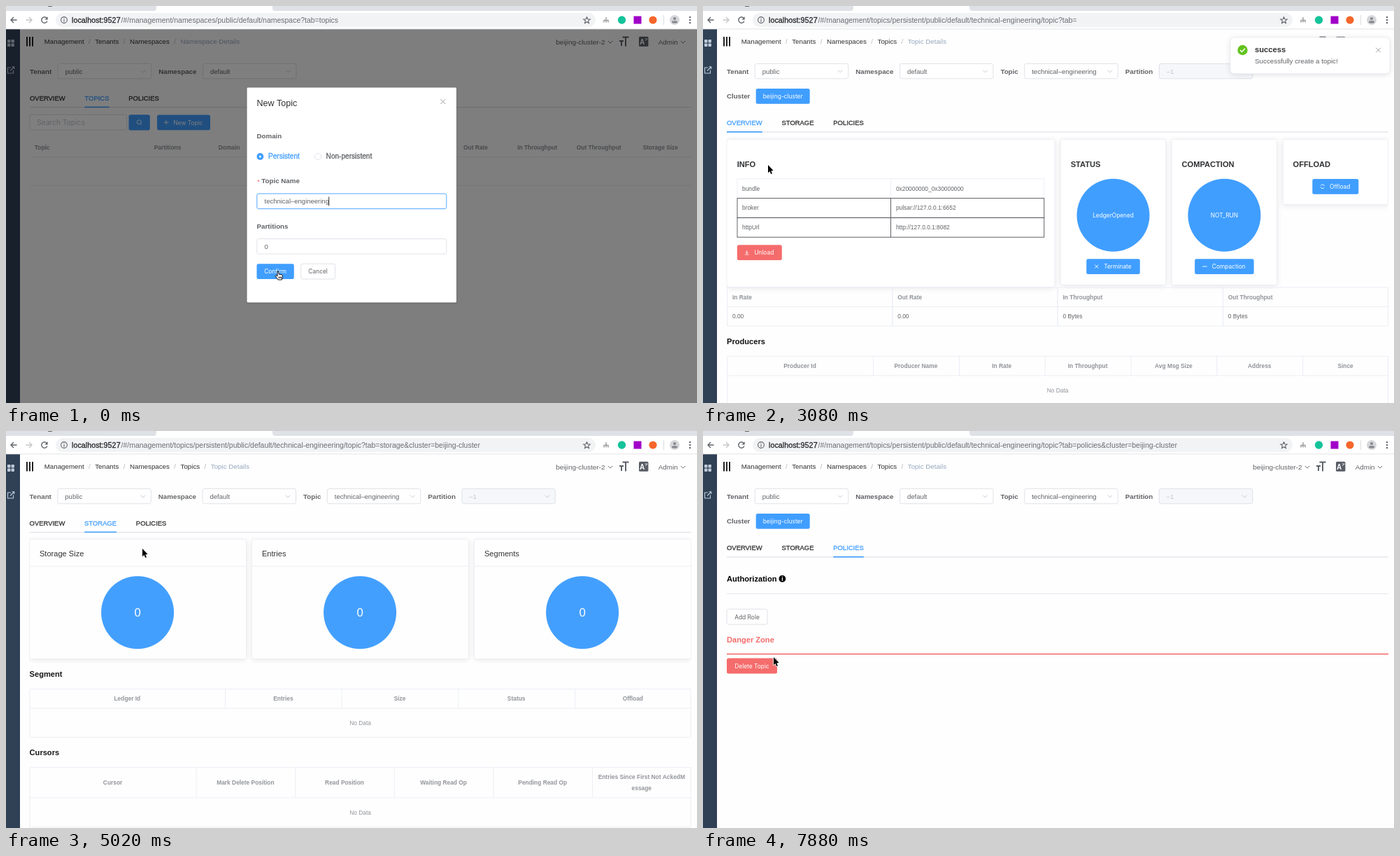
Recreate the animation shown at these times as an HTML page with a canvas. Size 988 by 567 pixels, loop 8000 ms.

```html
<!DOCTYPE html>
<html lang="en">
<head>
<meta charset="utf-8">
<title>Topic management</title>
<style>
html, body { margin: 0; width: 100%; height: 100%; overflow: hidden; background: #fefefe; }
canvas { display: block; width: 988px; height: 567px; }
</style>
</head>
<body>
<canvas id="stage"></canvas>
<script>
const W = 988, H = 567, LOOP = 8000;
const STEP = 78.9; // refresh interval of the screen
const LEFT = 34, WIDE = 946;
const dpr = window.devicePixelRatio || 1;

function context(canvas) {
  canvas.width = W * dpr;
  canvas.height = H * dpr;
  return canvas.getContext('2d');
}
let c = context(document.getElementById('stage'));
const buffer = context(document.createElement('canvas'));

const BLUE = '#409eff', RED = '#f56c6c', DARK = '#303133', TEXT = '#606266', MUTE = '#909399',
  PALE = '#c0c4cc', EDGE = '#dcdfe6', LINE = '#ebeef5', PAGE = '#fefefe', CHROME = '#5f6368';
const SANS = '"Liberation Sans", Arial, sans-serif', ROUND = 'Inter, sans-serif';

const clamp = v => Math.max(0, Math.min(1, v));

// cubic-bezier(.25, .1, .25, 1)
function ease(x) {
  let lo = 0, hi = 1, u = x;
  for (let i = 0; i < 20; i++) {
    u = (lo + hi) / 2;
    const v = .75 * u * (1 - u) + u ** 3;
    if (v < x) lo = u; else hi = u;
  }
  return .3 * u * (1 - u) ** 2 + 3 * u * u * (1 - u) + u ** 3;
}
const tween = (t, start, dur) => {
  const k = clamp((t - start) / dur);
  return k === 0 || k === 1 ? k : ease(k);
};

// opt: b = bold, m = medium, c = centred, i = Inter; returns the width
function txt(s, x, y, size, color, opt = '') {
  c.font = (opt.includes('b') ? 'bold ' : '') + size + 'px ' + (opt.includes('i') ? ROUND : SANS);
  c.textAlign = opt.includes('c') ? 'center' : 'left';
  c.fillStyle = c.strokeStyle = color;
  c.fillText(s, x, y);
  if (opt.includes('m')) {
    c.lineWidth = .3;
    c.strokeText(s, x, y);
  }
  return c.measureText(s).width;
}
function rect(x, y, w, h, color) {
  c.fillStyle = color;
  c.fillRect(x, y, w, h);
}
function box(x, y, w, h, fill, edge, r = 2.5) {
  c.beginPath();
  c.roundRect(x, y, w, h, r);
  if (fill) { c.fillStyle = fill; c.fill(); }
  if (edge) { c.strokeStyle = edge; c.lineWidth = .9; c.stroke(); }
}
function arc(x, y, r, from, to, color, lw) {
  c.beginPath();
  c.arc(x, y, r, from, to);
  c.strokeStyle = color;
  c.lineWidth = lw;
  c.stroke();
}
function disc(x, y, r, fill) {
  c.beginPath();
  c.arc(x, y, r, 0, 7);
  c.fillStyle = fill;
  c.fill();
}
// Each item after the width is one polyline around (x, y)
function strokes(x, y, color, lw, ...lines) {
  c.beginPath();
  for (const p of lines)
    for (let i = 0; i < p.length; i += 2) c[i ? 'lineTo' : 'moveTo'](x + p[i], y + p[i + 1]);
  c.strokeStyle = color;
  c.lineWidth = lw;
  c.stroke();
}
function shape(x, y, p, fill) {
  c.beginPath();
  for (let i = 0; i < p.length; i += 2) c.lineTo(x + p[i], y + p[i + 1]);
  c.closePath();
  c.fillStyle = fill;
  c.fill();
}
function raised(x, y, w, h, r, color, blur, dy, edge) {
  c.shadowColor = color;
  c.shadowBlur = blur * dpr;
  c.shadowOffsetY = dy * dpr;
  box(x, y, w, h, '#fff', null, r);
  c.shadowColor = 'transparent';
  if (edge) box(x, y, w, h, null, edge, r);
}
// Draws a group and lays it down with one common opacity
function layer(alpha, dx, dy, draw) {
  const main = c;
  c = buffer;
  c.setTransform(dpr, 0, 0, dpr, 0, 0);
  c.clearRect(0, 0, W, H);
  c.translate(dx, dy);
  draw();
  c = main;
  c.globalAlpha = alpha;
  c.drawImage(buffer.canvas, 0, 0, W, H);
  c.globalAlpha = 1;
}

const chevron = (x, y, color) => strokes(x, y, color, .9, [-3.2, -1.6, 0, 1.6, 3.2, -1.6]);
const cross = (x, y, r, color) => strokes(x, y, color, .9, [-r, -r, r, r], [r, -r, -r, r]);
const minus = (x, y) => strokes(x, y, '#fff', .9, [-3.3, 0, 3.3, 0]);
const tray = (x, y, down, color) => strokes(x, y, color, .8, [-3, 3, 3, 3], [0, -3, 0, 1.6],
  down ? [-2, -.5, 0, 1.5, 2, -.5] : [-2, -1, 0, -3, 2, -1]);
const refresh = (x, y) => [.5, 3.6].forEach(a => arc(x, y, 2.8, a, a + 2.4, '#fff', .9));
const backArrow = (x, dir, color) =>
  strokes(x, 20, color, 1.4, [4.5 * dir, 0, -4 * dir, 0], [0, -4, -4 * dir, 0, 0, 4]);

function browser(t) {
  rect(0, 0, W, 33, '#fff');
  box(-8, -10, 223, 17, '#dee1e6', null, 4);
  box(381, -10, 620, 17, '#dee1e6', null, 4);
  rect(60, 0, 6, 1, '#666');
  backArrow(11, 1, CHROME);
  backArrow(33, -1, '#c4c6c9');
  arc(55, 20, 4.2, .4, 5.5, CHROME, 1.4);
  shape(55, 20, [4.6, -5, 4.6, -.6, .4, -.6], CHROME);
  box(71, 10, 772, 20, '#f1f3f4', null, 10);
  arc(83, 20, 4.4, 0, 7, CHROME, 1.1);
  strokes(83, 20, CHROME, 1.2, [0, -2.6, 0, -1.4], [0, -.6, 0, 2.4]);
  txt('localhost:9527', 94, 23.7, 10.8, '#27292c', 'm');
  const topic = '/#/management/topics/persistent/public/default/technical-engineering/topic?tab=';
  const path = t < 2200 ? '/#/management/namespaces/public/default/namespace?tab=topics'
    : t < 3940 ? topic
    : topic + (t < 5990 ? 'storage' : 'policies') + '&cluster=beijing-cluster';
  txt(path, 164.6, 23.7, 10.48, '#6b6f74');
  const star = [];
  for (let i = 0; i <= 10; i++) {
    const r = i % 2 ? 2.2 : 5, a = i * Math.PI / 5 - Math.PI / 2;
    star.push(r * Math.cos(a), r * Math.sin(a));
  }
  strokes(830.5, 20.5, CHROME, 1.1, star);
  strokes(858, 20, '#9a9a9a', 1.4, [0, -4, 0, 3.5], [-3, 3.5, -3, .5, 3, .5, 3, 3.5]);
  disc(880.5, 20, 5.7, '#15c39a');
  rect(897.5, 14.5, 11, 11, '#a100c8');
  disc(925, 20, 5.6, '#f4662a');
  rect(940, 13, 1, 14, '#dadce0');
  disc(956, 20, 7, '#d5d7da');
  disc(956, 18, 2.1, '#85898e');
  box(952, 21.2, 8, 3.2, '#85898e', null, 1.6);
  for (const y of [16, 20, 24]) disc(978, y, 1.2, CHROME);
  rect(0, 32.5, W, .8, '#dcdcdc');
}

function breadcrumb(t) {
  const items = ['Management', 'Tenants', 'Namespaces'];
  if (t < 2300) items.push('Namespace Details');
  else items.push('Topics', 'Topic Details');
  let x = 54.7;
  items.forEach((s, i) => {
    const last = i === items.length - 1;
    x += txt(s, x, 54.3, 9.75, last ? '#97a8be' : DARK) + 6.3;
    if (!last || (t >= 2200 && t < 2300)) x += txt('/', x, 54.3, 9.8, '#b4b8c0') + 6.6;
  });
}

function shell(t) {
  rect(0, 33, 20, H - 33, '#304156');
  for (const x of [2, 7.5]) for (const y of [48, 53.5]) box(x, y, 4.4, 4.4, '#bfcbd9', null, .8);
  strokes(7, 91.5, '#bfcbd9', 1.1, [0, -3.5, -4.5, -3.5, -4.5, 4.5, 3.5, 4.5, 3.5, 0],
    [-1, 1, 4.5, -4.5], [1.5, -4.7, 4.7, -4.7, 4.7, -1.5]);
  for (const x of [29, 33, 37]) rect(x, 44, 2, 13.5, '#222');
  breadcrumb(t);
  txt('beijing-cluster-2', 786.3, 55, 9.95, TEXT);
  chevron(864, 51.5, TEXT);
  strokes(883, 51, '#5a5e66', 1.9, [-1.5, -6.5, 7.5, -6.5], [3, -6.5, 3, 6.5], [-6, -1, 0, -1], [-3, -1, -3, 6]);
  box(905, 43.7, 13.4, 14, '#5a5e66', null, 1.5);
  txt('A', 906, 55, 10, '#fff', 'b');
  strokes(915.5, 48, '#fff', .8, [-1.8, -1, 1.8, -1], [-1.5, 2, 1.5, -1]);
  txt('Admin', 932.8, 55, 9.8, TEXT);
  chevron(968, 51.5, TEXT);
}

// With an icon, the label moves right to make room for it
function button(x, y, w, fill, label, icon) {
  const plain = fill === '#fff', mid = x + w / 2;
  box(x, y, w, 21.8, fill, plain ? EDGE : null);
  const size = txt(label, mid + (icon ? 6.4 : 0), y + 14.1, 8.4, plain ? TEXT : '#fff', 'ci');
  if (icon) icon(mid - size / 2 - 4, y + 10.8);
}

function filters(topic, cluster) {
  const items = [['Tenant', 'public'], ['Namespace', 'default']];
  if (topic) items.push(['Topic', 'technical–engineering'], ['Partition', '–1']);
  let x = LEFT;
  for (const [label, value] of items) {
    const off = value === '–1';
    x += txt(label, x, 96.6, 9.75, TEXT, 'b') + 9;
    box(x, 82.4, 133.5, 21.4, off ? '#f5f7fa' : '#fff', EDGE);
    txt(value, x + 10.5, 96.7, 9.5, off ? PALE : TEXT);
    chevron(x + 122, 93.3, PALE);
    x += 144;
  }
  if (!cluster) return;
  txt('Cluster', LEFT, 132, 9.7, TEXT, 'b');
  button(75.7, 118, 77, BLUE, 'beijing-cluster');
}

function tabs(second, active, y, hover) {
  rect(LEFT, y + 13, WIDE, 1.2, '#dfe2e8');
  let x = LEFT;
  for (const s of ['OVERVIEW', second, 'POLICIES']) {
    const w = txt(s, x, y + 3.7, 9.45, s === active || s === hover ? BLUE : DARK, 'm');
    if (s === active) rect(x, y + 12.6, w, 1.6, BLUE);
    x += w + 27.8;
  }
}

// A first column of its own width, the others equal; one header row
function table(y, first, heads, headH, bodyH) {
  const rest = (WIDE - first) / (heads.length - 1);
  c.strokeStyle = LINE;
  c.lineWidth = 1;
  c.strokeRect(LEFT + .5, y, WIDE - 1, headH + bodyH);
  rect(LEFT, y + headH - .5, WIDE, 1, LINE);
  heads.forEach((s, i) => {
    const x = LEFT + (i ? first + rest * (i - .5) : first / 2);
    if (i) rect(x - rest / 2, y, 1, headH, LINE);
    s.split('\n').forEach((line, k, all) =>
      txt(line, x, y + headH / 2 + 3.1 + (k - (all.length - 1) / 2) * 16, 8.4, MUTE, 'bc'));
  });
  txt('No Data', 507, y + headH + 24, 8.4, MUTE, 'c');
}
const heading = (s, x, y, color = '#111') => txt(s, x, y, 11.1, color, 'b');

function card(x, y, w, h) {
  c.save();
  c.beginPath();
  c.rect(LEFT - .5, y - 10, WIDE + .5, h + 40);
  c.clip();
  raised(x, y, w, h, 2.8, 'rgba(0,0,0,.1)', 8.4, 1.4, LINE);
  c.restore();
}

function topicsPage(t) {
  filters();
  tabs('TOPICS', 'TOPICS', 131);
  box(LEFT, 155.3, 138.5, 21.6, '#fff', EDGE);
  txt('Search Topics', 44.3, 169.7, 10.2, PALE, 'i');
  box(175.5, 155.2, 30.3, 22.2, BLUE);
  arc(190.3, 165.8, 3, 0, 7, '#fff', .9);
  strokes(190.3, 165.8, '#fff', .9, [2.1, 2.1, 3.8, 3.8]);
  button(216, 155.4, 76, BLUE, 'New Topic', (x, y) => {
    minus(x, y);
    strokes(x, y, '#fff', .9, [0, -3.3, 0, 3.3]);
  });

  const colX = i => 231 + i * 88.1;
  txt('Topic', 40.8, 204.7, 8.4, MUTE, 'b');
  ['Partitions', 'Domain', 'Producers', 'Subscriptions', 'In Rate', 'Out Rate', 'In Throughput',
    'Out Throughput', 'Storage Size'].forEach((s, i) => txt(s, colX(i), 204.7, 8.4, MUTE, 'bc'));
  rect(LEFT, 215, WIDE, 1, LINE);
  if (t < 940) {
    txt('No Data', 506.7, 239.6, 8.4, TEXT, 'c');
    rect(LEFT, 256, WIDE, 1, LINE);
    return;
  }
  if (t >= 1570) rect(LEFT, 216, WIDE, 26.5, '#f5f7fa');
  rect(LEFT, 242.3, WIDE, 1, LINE);
  strokes(47.5, 228.5, TEXT, .9, [-1.6, -3.4, 1.8, 0, -1.6, 3.4]);
  txt('technical-engineering', 56.8, 231.8, 8.4, BLUE);
  ['0', 'persistent', '0', '0', '0.00', '0.00', '0 Bytes', '0 Bytes', '0 Bytes'].forEach((s, i) => {
    const icon = i > 3 && i < 8;
    const w = txt(s, colX(i) + (icon ? 4.6 : 0), 231.8, 8.4, TEXT, 'c');
    if (icon) tray(colX(i) - w / 2, 228.5, i % 2 === 0, TEXT);
  });
}

function overviewPage(t) {
  filters(true, true);
  tabs('STORAGE', 'OVERVIEW', 166.4, t >= 3700 ? 'STORAGE' : '');
  card(LEFT, 190.5, 469, 211);
  heading('INFO', 48.7, 229.6, DARK);
  c.strokeStyle = LINE;
  c.lineWidth = 1;
  [['bundle', '0x20000000_0x30000000'], ['broker', 'pulsar://127.0.0.1:6652'], ['httpUrl', 'http://127.0.0.1:8082']]
    .forEach(([key, value], i) => {
      const y = 246.8 + i * 27.8;
      c.strokeRect(49, y, 219.5, 27.8);
      c.strokeRect(268.5, y, 219.2, 27.8);
      txt(key, 56, y + 16.8, 8.4, TEXT);
      txt(value, 275.9, y + 16.8, 8.4, TEXT);
    });
  button(48.8, 341.2, 64, RED, 'Unload', (x, y) => tray(x, y, true, '#fff'));

  [['STATUS', 'LedgerOpened', 'Terminate', 76.5, (x, y) => cross(x, y, 2.5, '#fff')],
    ['COMPACTION', 'NOT_RUN', 'Compaction', 84.5, minus],
    ['OFFLOAD', '', 'Offload', 66, refresh]].forEach(([title, state, action, w, icon], i) => {
    const x = 511.3 + i * 158.9, mid = x + 75.2;
    card(x, 190.5, 150.4, state ? 208 : 93);
    heading(title, x + 14.4, 229.6, DARK);
    if (state) {
      disc(mid, 298.8, 52, BLUE);
      txt(state, mid, 301.6, 8.3, '#fff', 'ci');
    }
    button(mid - w / 2, state ? 361.2 : 247, w, BLUE, action, icon);
  });

  ['In Rate', 'Out Rate', 'In Throughput', 'Out Throughput'].forEach((s, i) => {
    const x = LEFT + .5 + i * 236.3;
    c.strokeStyle = LINE;
    c.lineWidth = 1;
    for (const y of [402, 429.5]) c.strokeRect(x, y, 236.3, 27.5);
    txt(s, x + 7.4, 418.8, 8.4, MUTE, 'b');
    txt(i < 2 ? '0.00' : '0 Bytes', x + 7.4, 445.9, 8.4, TEXT);
  });
  heading('Producers', LEFT, 482.6);
  table(500.3, 209, ['Producer Id', 'Producer Name', 'In Rate', 'In Throughput', 'Avg Msg Size',
    'Address', 'Since'], 27.5, 41);
}

function storagePage(t) {
  const cluster = t >= 5200;
  filters(true, cluster);
  c.translate(0, cluster ? 35.4 : 0);
  tabs('STORAGE', 'STORAGE', 131, t >= 5500 ? 'POLICIES' : '');
  ['Storage Size', 'Entries', 'Segments'].forEach((s, i) => {
    const x = LEFT + i * 318, mid = x + 154.5;
    card(x, 154.7, 310, 171);
    txt(s, x + 14.3, 178.6, 11.1, DARK);
    rect(x, 192.6, 310, 1, LINE);
    disc(mid, 259.2, 52, BLUE);
    txt('0', mid, 265.2, 16.8, '#fff', 'c');
  });
  heading('Segment', LEFT, 351);
  table(368.6, 279.5, ['Ledger Id', 'Entries', 'Size', 'Status', 'Offload'], 27.5, 41.5);
  heading('Cursors', LEFT, 463.2);
  table(480.4, 238, ['Cursor', 'Mark Delete Position', 'Read Position', 'Waiting Read Op',
    'Pending Read Op', 'Entries Since First Not AckedM\nessage'], 43.4, 41.5);
}

function policiesPage(t) {
  const cluster = t >= 7100;
  filters(true, cluster);
  c.translate(0, cluster ? 0 : -35.4);
  tabs('STORAGE', 'POLICIES', 166.4);
  heading('Authorization', LEFT, 214.8, '#000');
  disc(113.4, 211, 4.9, '#000');
  txt('i', 113.4, 214.2, 8.5, '#fff', 'bc');
  rect(LEFT, 232, WIDE, 1, '#e3e6ec');
  button(LEFT, 254.4, 58, '#fff', 'Add Role');
  heading('Danger Zone', LEFT, 301.6, RED);
  rect(LEFT, 318, WIDE, 1.1, '#f23c3c');
  button(LEFT, 324.6, 72, RED, 'Delete Topic');
}

// page, enter start, leave start, leave duration
const PAGES = [[topicsPage, -900, 2210, 350], [overviewPage, 2580, 3910, 500],
  [storagePage, 4560, 5830, 480], [policiesPage, 6630, LOOP, 500]];

function content(t) {
  for (const [draw, enter, leave, dur] of PAGES) {
    if (t < enter || t >= leave + dur) continue;
    const a = tween(t, enter, 500), b = tween(t, leave, dur);
    c.save();
    c.beginPath();
    c.rect(20, 70, W - 20, H - 70);
    c.clip();
    layer(a * (1 - b), 21 * (a - 1 + b), 0, () => draw(t));
    c.restore();
  }
}

function progress(t) {
  for (const start of [3905, 5960]) {
    const age = t - start;
    if (age > 0 && age < 300) rect(0, 33, W * Math.min(1, age / 186), 1.6, '#2f9cf0');
  }
}

function notice(t) {
  const a = tween(t, 674, 300), b = tween(t, 3610, 300);
  if (!a || b === 1) return;
  layer(1 - b, 240 * (1 - a), 0, () => {
    raised(754, 45, 228, 51.5, 5.6, 'rgba(0,0,0,.12)', 8.4, 1.4, LINE);
    disc(771.5, 63, 7.2, '#62c31c');
    strokes(771.5, 63, '#fff', 1.5, [-3.4, 0, -1, 2.5, 3.4, -2.2]);
    txt('success', 789, 65.8, 11.2, DARK, 'b');
    txt('Successfully create a topic!', 789, 82.2, 9.8, TEXT);
    cross(965.5, 63, 3.3, MUTE);
  });
}

function form(t) {
  const label = (s, x, y) => txt(s, x, y, 9.75, TEXT, 'b');
  const input = (y, value, edge) => {
    box(358.8, y, 271, 21.6, '#fff', edge);
    txt(value, 369.5, y + 14.2, 9.5, TEXT);
  };
  raised(344.5, 116.5, 299.5, 307, 1.4, 'rgba(0,0,0,.3)', 2.1, .7);
  txt('New Topic', 358.5, 143, 12.5, DARK);
  cross(624.7, 136.6, 3.4, MUTE);
  label('Domain', 358.5, 189.4);
  disc(363.4, 215, 4.9, BLUE);
  disc(363.4, 215, 1.5, '#fff');
  txt('Persistent', 375, 218.4, 10.1, BLUE, 'm');
  arc(446, 215, 4.6, 0, 7, EDGE, .9);
  txt('Non-persistent', 457.6, 218.4, 10.1, TEXT, 'm');
  txt('*', 359, 253.6, 9.8, RED);
  label('Topic Name', 365.3, 253.2);
  input(268, 'technical–engineering', t < 600 ? BLUE : EDGE);
  if (t < 140) rect(461.2, 272.5, 1, 13, '#333');
  label('Partitions', 358.5, 317.6);
  input(332.5, '0', EDGE);
  button(358.5, 368.2, 53.3, BLUE, 'Confirm');
  button(421.6, 368.2, 49, '#fff', 'Cancel');
}

function dialog(t) {
  const shade = 1 - tween(t, 660, 200), k = tween(t, 660, 300);
  rect(0, 33, W, H - 33, `rgba(0,0,0,${.5 * shade})`);
  if (k < 1) layer(1 - k, 0, -14 * k, () => form(t));
}

// Pointer moves: start, duration, x, y, and until when it shows a hand there
const MOVES = [[-1, 1, 389, 379, 140], [139, 1, 388, 388], [1000, 730, 93, 227, 2560],
  [3420, 280, 128, 174, 4290], [4290, 680, 195, 168], [5210, 290, 206, 172, 5990],
  [5990, 320, 283, 239], [7440, 370, 101, 323]];

function pointer(t) {
  let x = 389, y = 379, hand = false;
  for (const [start, dur, tx, ty, until = 0] of MOVES) {
    if (t < start) break;
    const k = clamp((t - start) / dur);
    x += (tx - x) * k;
    y += (ty - y) * k;
    hand = k === 1 && t < until;
  }
  c.lineJoin = 'round';
  if (hand) {
    const p = [-1, 0, 1, 0, 1, 4, 5, 4.6, 6.4, 5.6, 6.4, 8.5, 5.3, 12, 0, 12, -4, 6.6, -3, 5.6, -1, 7];
    shape(x, y, p, '#fff');
    strokes(x, y, '#111', 1, [...p, -1, 0], ...[1.2, 3, 4.7].map(f => [f, 7.6, f, 10]));
  } else {
    const p = [0, 0, 0, 11.2, 2.5, 9, 4.2, 13, 6, 12.2, 4.3, 8.4, 7.6, 8.1];
    strokes(x, y, '#fff', 1.6, [...p, 0, 0]);
    shape(x, y, p, '#000');
  }
  c.lineJoin = 'miter';
}

function frame(now) {
  const t = Math.floor((now % LOOP) / STEP) * STEP;
  c.setTransform(dpr, 0, 0, dpr, 0, 0);
  rect(0, 0, W, H, PAGE);
  shell(t);
  content(t);
  progress(t);
  dialog(t);
  notice(t);
  browser(t);
  pointer(t);
  requestAnimationFrame(frame);
}
requestAnimationFrame(frame);
</script>
</body>
</html>
```
